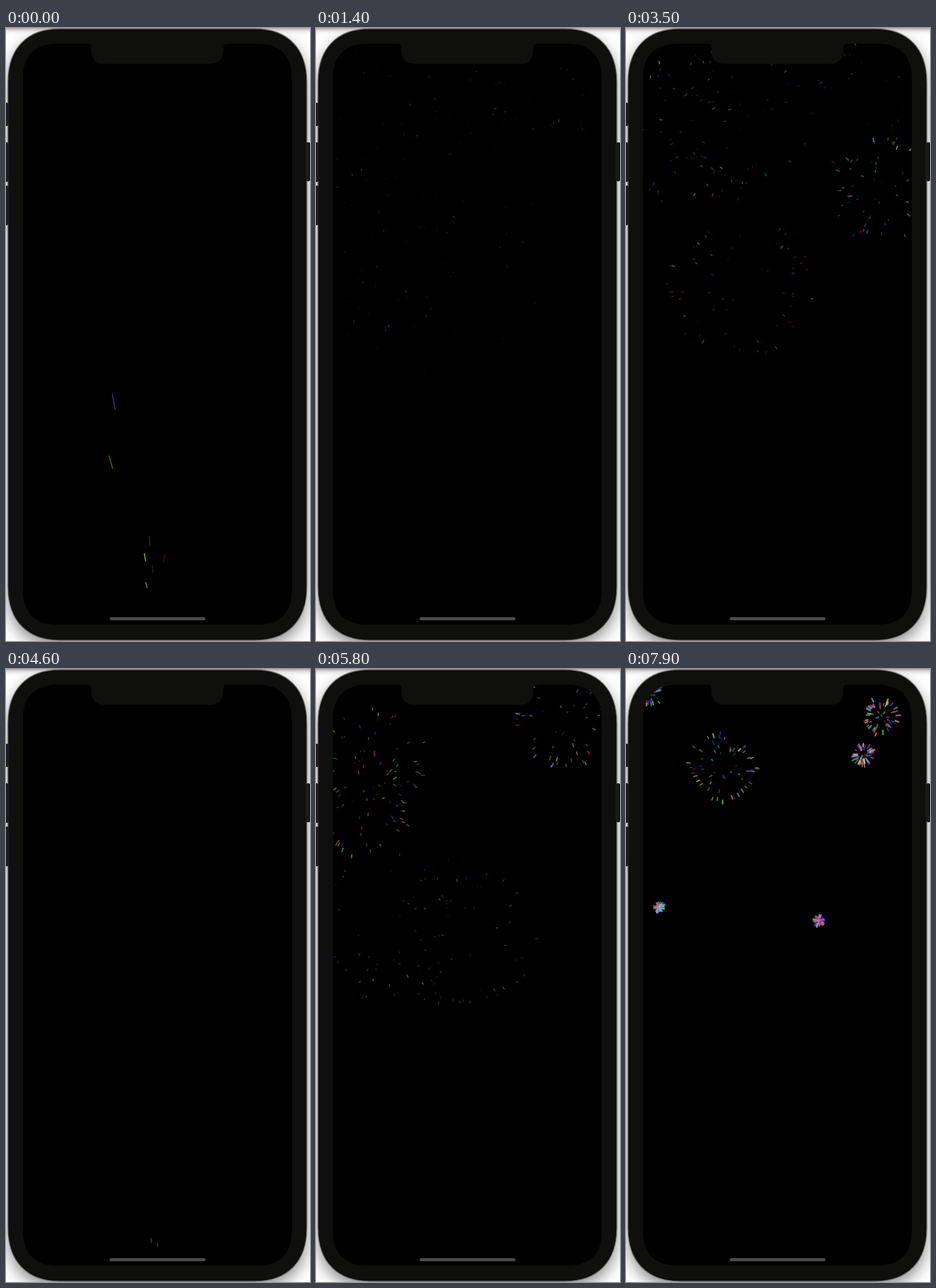
Animation, 484 px wide and 976 px high, one loop 8 s. Source, as an HTML page:

```html
<!DOCTYPE html>
<html lang="en">
<head>
<meta charset="utf-8">
<title>Fireworks</title>
<style>
html, body { margin: 0; width: 100%; height: 100%; overflow: hidden; background: #fff; }
svg { display: block; width: 484px; height: 976px; }
</style>
</head>
<body>
<svg viewBox="0 0 484 976">
  <defs>
    <filter id="blur" x="-20%" y="-20%" width="140%" height="140%"><feGaussianBlur stdDeviation="12"/></filter>
    <linearGradient id="top" x2="0" y2="1">
      <stop offset="0" stop-color="#aaa"/>
      <stop offset=".4" stop-color="#ddd" stop-opacity=".6"/>
      <stop offset="1" stop-color="#fff" stop-opacity="0"/>
    </linearGradient>
    <path id="body" d="M86 1H396C448 1 479 32 479 86V890C479 944 448 975 396 975H86C34 975 3 944 3 890V86C3 32 34 1 86 1Z"/>
    <path id="screen" d="M82 25H130Q136 25 136 31V35Q136 57 158 57H324Q346 57 346 35V31Q346 25 352 25H400C436 25 455 44 455 80V895C455 931 436 950 400 950H82C46 950 27 931 27 895V80C27 44 46 25 82 25Z"/>
    <clipPath id="clip"><use href="#screen"/></clipPath>
  </defs>
  <rect width="484" height="976" fill="#fff"/>
  <use href="#body" y="10" filter="url(#blur)" opacity=".45"/>
  <rect width="484" height="14" fill="url(#top)"/>
  <g fill="#1b1b1b" stroke="#050505">
    <rect x="-3" y="119.500" width="8" height="36" rx="1.500"/>
    <rect x="-3" y="182.500" width="8" height="62" rx="1.500"/>
    <rect x="-3" y="251.500" width="8" height="62" rx="1.500"/>
    <rect x="476.500" y="182.500" width="7" height="61" rx="1.500"/>
  </g>
  <use href="#body" fill="#0f0f0e" stroke="#737573" stroke-width="1.300"/>
  <g fill="#1b1b1b">
    <rect y="120" width="5" height="35"/>
    <rect y="183" width="5" height="61"/>
    <rect y="252" width="5" height="61"/>
    <rect x="477" y="183" width="6" height="60"/>
  </g>
  <use href="#screen" fill="#000"/>
  <g id="sky" clip-path="url(#clip)"></g>
  <rect x="165" y="938" width="152.500" height="5" rx="2.500" fill="#4b4b4b"/>
</svg>
<script>
const LOOP = 8000, STEP = 100, LIFE = 1400, REACH = 180, FALL = 35, COUNT = 58;
const BASE = { x: 237, y: 940 };
const sky = document.getElementById('sky');

// x, y of the burst, burst time, flight time, trail colour
const shells = [
  [88, 155, 270, 800, '#263c68'], [45, 258, 320, 808, '#2a7040'],
  [200, 395, 350, 669, '#2b3014'], [205, 245, 400, 603, '#262626'],
  [375, 38, 600, 889, '#4a1216'], [85, 340, 600, 854, '#7c8080'],
  [115, 190, 510, 797, '#79c832'],

  [420, 112, 2780, 760, '#3a8a78'], [168, 147, 2830, 760, '#7a4aa8'],
  [184, 408, 2870, 720, '#4a58b0'], [66, 154, 2915, 780, '#5a9a3a'],
  [405, 255, 3083, 800, '#b85044'],

  [85, 150, 5330, 907, '#35527e'], [400, 75, 5400, 956, '#802a50'],
  [110, 395, 5130, 580, '#5a8a50'], [230, 420, 5150, 600, '#9a9444'],
  [70, 210, 5380, 850, '#a05048'],

  [155, 155, 7640, 880, '#5a9a50'], [407, 75, 7760, 840, '#a84a70'],
  [38, 38, 7795, 840, '#3a9a88'], [377, 136, 7815, 830, '#6a60b0'],
  [52, 379, 7855, 850, '#a050a8'], [307, 401, 7855, 850, '#a87a58']
].map(([x, y, at, flight, color], i) => ({ x, y, at, flight, color, sparks: makeSparks(i + 1) }));

function seeded(seed) {
  let s = seed * 7919;
  return () => {
    s = (s + 0x6D2B79F5) | 0;
    let n = Math.imul(s ^ (s >>> 15), s | 1);
    n ^= n + Math.imul(n ^ (n >>> 7), n | 61);
    return ((n ^ (n >>> 14)) >>> 0) / 4294967296;
  };
}

// Directions are spread over a sphere and seen from the front.
function makeSparks(seed) {
  const rnd = seeded(seed);
  return Array.from({ length: COUNT }, () => {
    const angle = rnd() * Math.PI * 2, z = rnd() * 2 - 1, flat = Math.sqrt(1 - z * z);
    return {
      cos: Math.cos(angle), sin: Math.sin(angle), flat,
      speed: flat * (0.8 + 0.2 * rnd()),
      size: 0.4 + 0.45 * rnd() + 0.2 * (z + 1),
      life: 0.65 + 0.35 * rnd(),
      glow: 0.55 + 0.45 * rnd(),
      color: `hsl(${rnd() * 360 | 0},${45 + rnd() * 45 | 0}%,${42 + rnd() * 32 | 0}%)`
    };
  });
}

function line(x1, y1, x2, y2, color, width, alpha) {
  const [a, b, c, d] = [x1, y1, x2, y2].map(v => v.toFixed(1));
  return `<line x1="${a}" y1="${b}" x2="${c}" y2="${d}" stroke="${color}" ` +
    `stroke-width="${width.toFixed(2)}" opacity="${alpha.toFixed(2)}"/>`;
}

function rocket(s, t) {
  const p = 1 - (s.at - t) / s.flight;
  if (p < 0.15) return '';
  const dx = s.x - BASE.x, dy = s.y - BASE.y, dist = Math.hypot(dx, dy);
  const f = p * p, half = 0.68 * Math.sqrt(f * dist) / dist;
  const x = k => BASE.x + dx * k, y = k => BASE.y + dy * k;
  return line(x(f - half), y(f - half), x(f + half), y(f + half), s.color, 1.3 + 0.8 * f, 1);
}

function burst(s, age) {
  const p = age / LIFE, radius = REACH * (1 - (1 - p) ** 2);
  return s.sparks.map(k => {
    const left = 1 - p / k.life;
    if (left <= 0) return '';
    const r = radius * k.speed, x = s.x + k.cos * r, y = s.y + k.sin * r + FALL * p * p;
    const len = Math.min(r + 2, 1.2 + 8.5 * k.size * left * (0.3 + 0.7 * k.flat));
    const width = 0.4 + 2.5 * k.size * left;
    const alpha = left ** 0.9 * k.glow * (0.45 + 0.55 * k.flat);
    return line(x, y, x - k.cos * len, y - k.sin * len, k.color, width, alpha);
  }).join('');
}

function draw(t) {
  sky.innerHTML = shells.map(s => {
    const age = t - s.at;
    if (age >= LIFE) return '';
    return age < 0 ? rocket(s, t) : burst(s, age);
  }).join('');
}

let start = null, shown = -1;
function tick(now) {
  if (start === null) start = now;
  const t = Math.floor(((now - start) % LOOP) / STEP) * STEP;
  if (t !== shown) draw(shown = t);
  requestAnimationFrame(tick);
}
draw(0);
requestAnimationFrame(tick);
</script>
</body>
</html>
```
